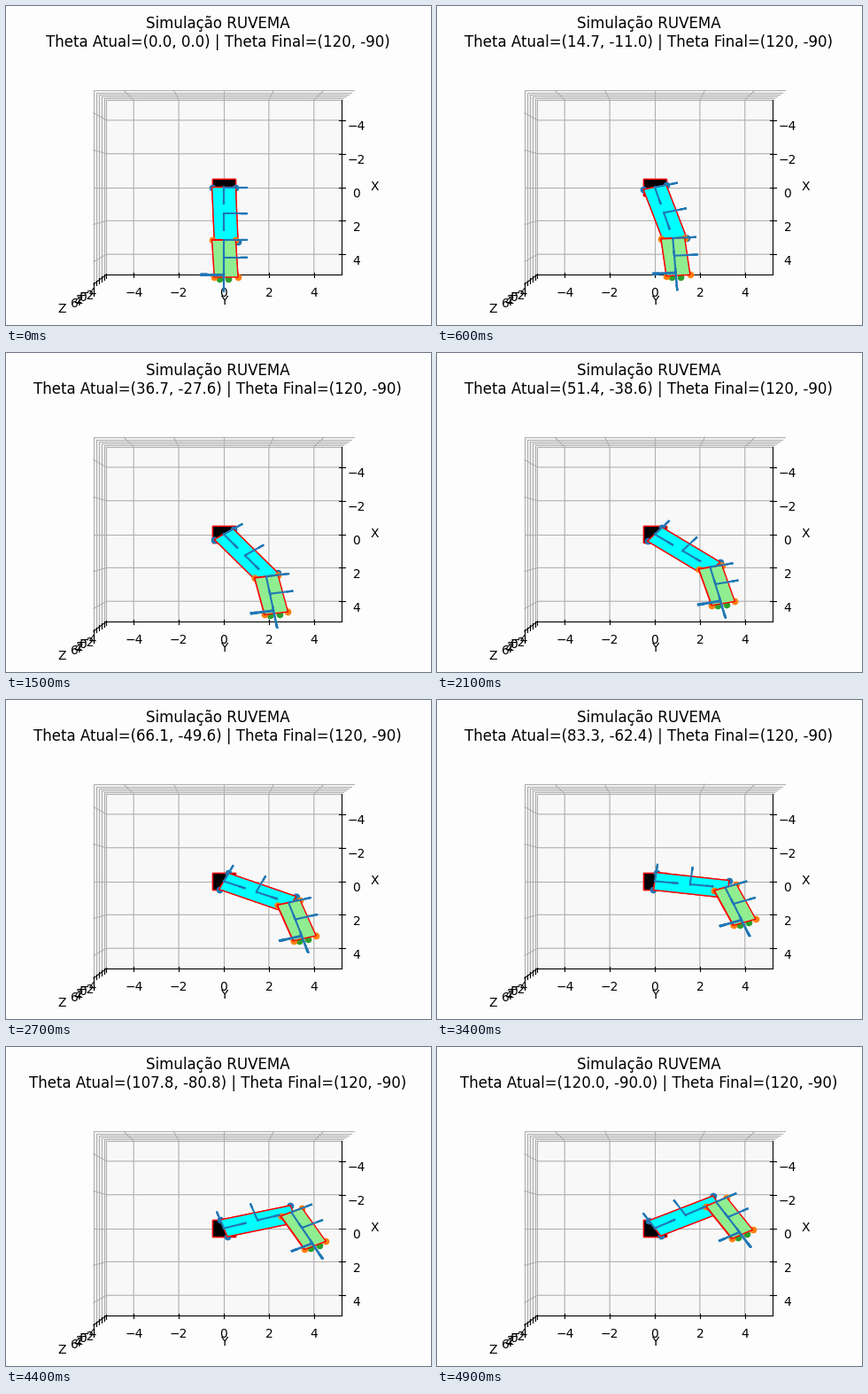
Recreate the animation shown at these times as a matplotlib script. Size 480x360 px, loop 7900 ms.

```python
import numpy as np
import matplotlib.pyplot as plt
from matplotlib.animation import FuncAnimation
from matplotlib.collections import LineCollection
from matplotlib.patches import Polygon

W, H = 480, 360
STEPS, FRAMES, INTERVAL = 49, 79, 100
GOAL = (120, -90)
L1, L2 = 3, 2
LIM = 5 + 10 / 48           # half-width of the padded box
Z_MID = 1
CX, CY = 246, 204.55        # screen centre of the box
SKEW = np.array([0.1, 0.1])  # offset of each link's far end

plt.rcParams["font.family"] = "DejaVu Sans"
fig = plt.figure(figsize=(W / 100, H / 100), dpi=100, facecolor="#fdfdfd")
ax = fig.add_axes([0, 0, 1, 1])
ax.set(xlim=(0, W), ylim=(H, 0))
ax.axis("off")


def project(x, y, z):
    """Top-down perspective: X runs down the screen, Y to the right."""
    depth = 10 - (np.asarray(z) - Z_MID) / 10
    return np.stack([CX + 267.7 * np.asarray(y) / depth,
                     CY + 199.0 * np.asarray(x) / depth], axis=-1)


def flat(points, z):
    points = np.asarray(points)
    return project(points[:, 0], points[:, 1], np.full(len(points), z))


def path(*points, **style):
    xy = np.array([project(*p) for p in points])
    ax.plot(xy[:, 0], xy[:, 1], **style)


def label(x, y, text):
    ax.text(x, y, text, size=10, ha="center", va="center_baseline")


def signed(v):
    return str(v).replace("-", "\u2212")


# --- static box -----------------------------------------------------------
BOT, TOP = Z_MID - LIM, Z_MID + LIM


def pane(points, gray):
    ax.add_patch(Polygon([project(*p) for p in points], fc=str(gray), ec="none"))


pane([(-LIM, -LIM, BOT), (-LIM, LIM, BOT), (-LIM, LIM, TOP), (-LIM, -LIM, TOP)], 0.975)
pane([(-LIM, -LIM, BOT), (LIM, -LIM, BOT), (LIM, -LIM, TOP), (-LIM, -LIM, TOP)], 0.95)
pane([(-LIM, -LIM, BOT), (LIM, -LIM, BOT), (LIM, LIM, BOT), (-LIM, LIM, BOT)], 0.972)

grid = dict(color="#b0b0b0", lw=0.8)
axis = dict(color="black", lw=0.8)
for t in range(-4, 5, 2):
    path((t, LIM, BOT), (t, -LIM, BOT), (t, -LIM, TOP), **grid)
    path((LIM, t, BOT), (-LIM, t, BOT), (-LIM, t, TOP), **grid)
for t in range(-4, 7, 2):
    path((LIM, -LIM, t), (-LIM, -LIM, t), (-LIM, LIM, t), **grid)

path((-LIM, LIM, BOT), (LIM, LIM, BOT), **axis)
path((LIM, LIM, BOT), (LIM, -LIM, BOT), **axis)
path((LIM, -LIM, BOT), (LIM, -LIM, TOP), **axis)
IN, OUT = LIM - 0.09, LIM + 0.18
for t in range(-4, 5, 2):
    path((t, IN, BOT), (t, OUT, BOT), **axis)
    path((IN, t, BOT), (OUT, t, BOT), **axis)
    label(396, 210 + 19 * t, signed(t))
    label(CX + 25.44 * t, 322.7, signed(t))
for t in range(-4, 7, 2):
    path((IN, -LIM, t), (OUT, -LIM, t), **axis)
    label(93 - 1.6 * (t + 4), 323 + 1.2 * (t + 4), signed(t))
label(416, 202.7, "X")
label(246, 331.3, "Y")
label(63.5, 340, "Z")

# --- robot ----------------------------------------------------------------
SQUARE = np.array([(-1, -1), (1, -1), (1, 1), (-1, 1)])
edge = dict(ec="red", lw=1)
for z in (-1, 0):
    ax.add_patch(Polygon(flat(SQUARE * 0.5, z), fc="black", zorder=3, **edge))


def rot(deg):
    a = np.radians(deg)
    return np.array([(np.cos(a), -np.sin(a)), (np.sin(a), np.cos(a))])


def link_corners(start, length, deg):
    r = rot(deg)
    ends = [(0, -0.5), (0, 0.5), (length, 0.5), (length, -0.5)]
    pts = start + np.array(ends) @ r.T
    pts[2:] += SKEW
    return pts


class Block:
    """A prism seen from above, with dots at its corners."""

    def __init__(self, color, dot, zorder, z=(0, 1)):
        self.z = z
        self.dots = [ax.plot([], [], "o", ms=np.sqrt(20), mew=1, color=dot,
                             alpha=a, zorder=zorder)[0] for a in (0.3, 1)]
        self.faces = []
        if color:
            self.faces = [ax.add_patch(Polygon(SQUARE, fc=color,
                                               zorder=zorder + 0.5, **edge))
                          for _ in z]

    def move(self, corners):
        for i, z in enumerate(self.z):
            xy = flat(corners, z)
            self.dots[i].set_data(xy[:, 0], xy[:, 1])
            if self.faces:
                self.faces[i].set_xy(xy)


upper = Block("cyan", "C0", 4)
tool = Block(None, "C2", 5)
fore = Block("lightgreen", "C1", 6)
arrows = ax.add_collection(LineCollection([], colors="C0", linewidths=1.5, zorder=8))


def arrow(origin, v):
    """Shaft and two head strokes; heads tilt in the vertical plane."""
    tip = origin + v
    side = np.array([1, 0, 0]) if v[2] else np.array([0, 0, 1])
    c, s = np.cos(np.radians(15)), np.sin(np.radians(15))
    tails = [origin] + [tip - 0.3 * (c * v + k * s * side) for k in (-1, 1)]
    return [project(*np.array([tail, tip]).T) for tail in tails]


def triad(pos, deg, z=0.5, flip=1):
    r = rot(deg)
    origin = np.array([*pos, z])
    axes = ([*r[:, 0], 0], [*(flip * r[:, 1]), 0], [0, 0, flip])
    return [seg for v in axes for seg in arrow(origin, np.array(v))]


title = fig.text(0.498, 0.969, "", size=12, ha="center", va="top")


def update(i):
    k = min(i, STEPS) / STEPS
    a, b = (g * k + 0.0 for g in GOAL)
    c = a + b
    base = np.zeros(2)
    elbow = L1 * rot(a)[:, 0]
    hand = elbow + L2 * rot(c)[:, 0]

    upper.move(link_corners(base, L1, a))
    fore.move(link_corners(elbow, L2, c))
    tool.move(hand + SQUARE * 0.2 @ rot(c).T)
    arrows.set_segments(triad(base, a) + triad(elbow / 2, a) + triad(elbow, c)
                        + triad((elbow + hand) / 2, c)
                        + triad(hand, c, 0.5, -1) + triad(hand, c, -0.5, -1))
    title.set_text(f"Simulação RUVEMA\nTheta Atual=({a:.1f}, {b:.1f}) | "
                   f"Theta Final=({GOAL[0]}, {GOAL[1]})")
    return []


anim = FuncAnimation(fig, update, frames=FRAMES, interval=INTERVAL,
                     init_func=lambda: update(0), repeat=True, repeat_delay=0)
plt.show()
```
